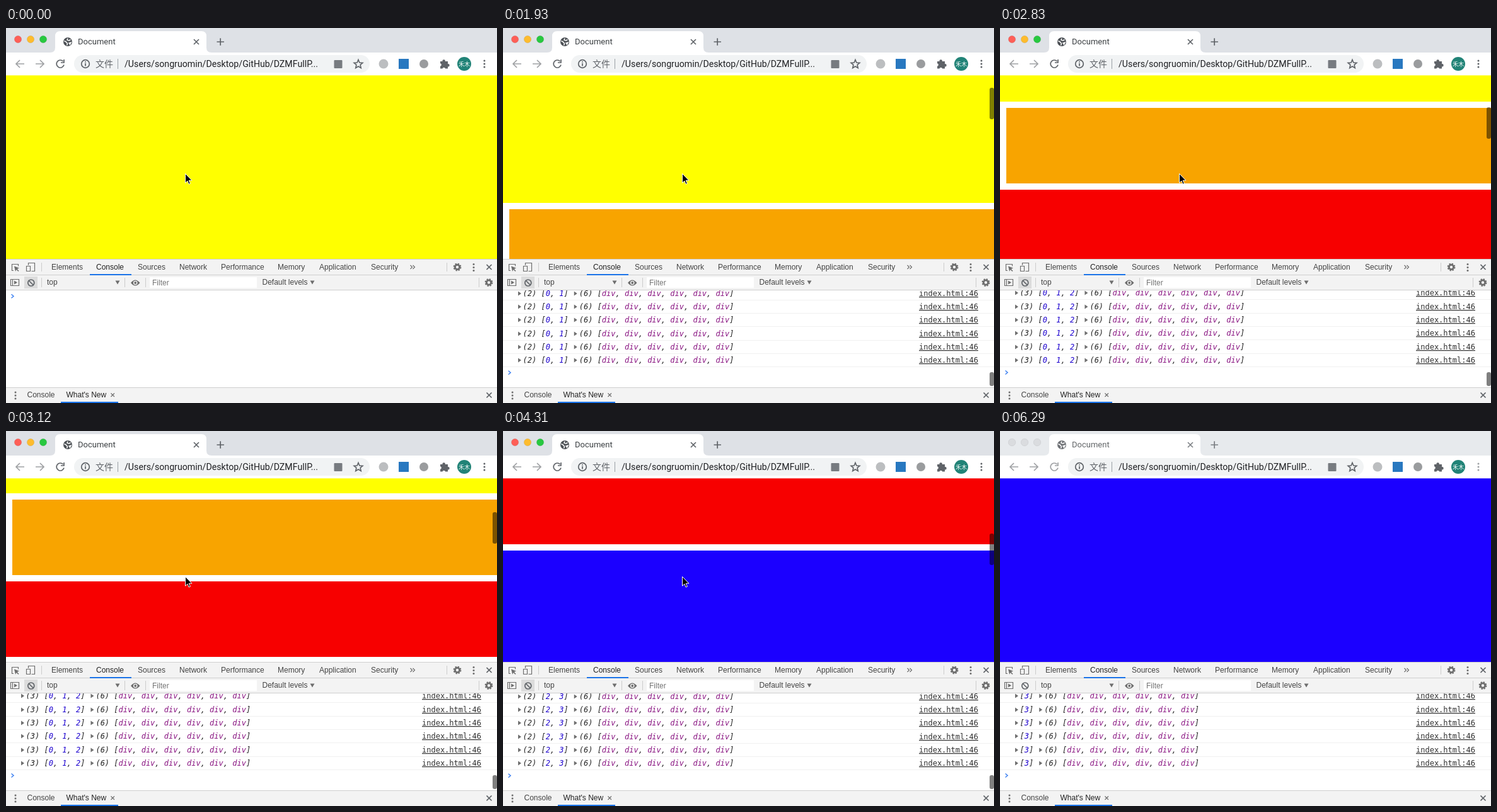
An HTML page for the animation above (6.39 s loop, 779 by 596 pixels).

```html
<!DOCTYPE html>
<html lang="en">
<head>
<meta charset="utf-8">
<title>Document</title>
<style>
html, body { margin: 0; width: 100%; height: 100%; overflow: hidden; background: #fff; }
svg { display: block; width: 779px; height: 596px; }
text { white-space: pre; }
.ui { font: 12px "Liberation Sans", Arial, sans-serif; fill: #444; }
.tab { font: 13px Roboto, sans-serif; fill: #3c4043; }
.url { font: 14.2px Roboto, sans-serif; fill: #202124; }
.cjk { font: 14px "Noto Sans CJK SC", "Noto Sans CJK", sans-serif; fill: #5f6368; }
.mono { font: 12px "DejaVu Sans Mono", monospace; fill: #303030; }
.log { font-style: oblique; fill: #222; }
.num { fill: #1c00cf; }
.tag { fill: #881280; }
.line { fill: none; stroke: #5f6368; stroke-width: 1.7; }
.thin { fill: none; stroke: #6e6e6e; stroke-width: 1.2; }
.dark { fill: #5f6368; }
.mid { fill: #6e6e6e; }
</style>
</head>
<body>
<svg viewBox="0 0 779 596" xmlns="http://www.w3.org/2000/svg">
  <defs>
    <clipPath id="view"><rect y="75" width="779" height="292"/></clipPath>
    <clipPath id="pane"><rect y="417" width="779" height="154"/></clipPath>
    <g id="gear">
      <circle r="3.6" fill="none" stroke="#6e6e6e" stroke-width="2.8"/>
      <circle r="5.4" fill="none" stroke="#6e6e6e" stroke-width="2" stroke-dasharray="2.4 1.84"/>
    </g>
    <path id="cross" d="M-4-4 4 4M4-4-4 4"/>
    <g id="dots"><circle cy="-5" r="1.5"/><circle r="1.5"/><circle cy="5" r="1.5"/></g>
    <path id="down" d="M-3.5-3h7l-3.5 6z"/>
  </defs>

  <!-- page -->
  <rect width="779" height="596" fill="#fff"/>
  <g clip-path="url(#view)">
    <g id="page">
      <rect width="779" height="300" fill="#ff0"/>
      <rect x="10" y="310" width="769" height="120" fill="#f8a400"/>
      <rect y="440" width="779" height="120" fill="#f70000"/>
      <rect y="570" width="779" height="400" fill="#1b00ff"/>
    </g>
    <rect id="pageBar" x="772" width="7" height="50" rx="3"/>
  </g>

  <!-- browser bar -->
  <rect id="strip" width="779" height="39"/>
  <path d="M70 39q8 0 8-8V13q0-8 8-8h224q8 0 8 8v18q0 8 8 8z" fill="#fff"/>
  <g id="lights"></g>
  <g id="title">
    <circle cx="98" cy="22" r="7" fill="#4d5156"/>
    <path d="M92.500 20.500l3.500 2 1.500 2.500-1 2.500M98 16.500l-1 2.500 3 1 2.500-1.500M100 24l3-1-1.500 3z" fill="none" stroke="#fff" stroke-width="1.5"/>
    <text class="tab" x="114" y="26">Document</text>
    <use href="#cross" x="302" y="22" class="line"/>
    <path class="line" stroke-width="2" d="M334.500 22h11.500M340.200 16.200v11.600"/>
  </g>
  <g opacity=".6"><path class="line" d="M29 57H16.500M22 51l-6 6 6 6"/></g>
  <g opacity=".6"><path class="line" d="M47 57h12.500M54 51l6 6-6 6"/></g>
  <path id="reload" class="line" stroke-width="2" d="M90.500 52.800A6 6 0 1 0 92 58.500M92 50v5h-5"/>
  <rect x="108" y="43" width="469" height="28" rx="14" fill="#f1f3f4"/>
  <circle class="line" cx="126" cy="57" r="6.300"/>
  <path class="line" d="M126 56v4.500M126 53v1.700"/>
  <text class="cjk" x="142" y="62">文件</text>
  <rect x="177" y="49" width="1" height="16" fill="#9aa0a6"/>
  <text class="url" x="188" y="62">/Users/songruomin/Desktop/GitHub/DZMFullP...</text>
  <rect x="520.500" y="51" width="13" height="13" rx="1" fill="#777b80"/>
  <path class="line" stroke-width="1.400" d="M559 50.500l1.900 4.500 4.900.4-3.700 3.200 1.100 4.800-4.200-2.500-4.200 2.500 1.100-4.800-3.700-3.200 4.900-.4z"/>
  <circle cx="599" cy="57" r="7.500" fill="#bcbec0"/>
  <rect x="623" y="49" width="16" height="16" fill="#2878c0"/>
  <circle cx="663" cy="57" r="7" fill="#9a9c9e"/>
  <path class="dark" d="M689 53h3.500a2.200 2.200 0 1 1 4.300 0h4.200v4a2.200 2.200 0 1 1 0 4.300v3.200h-4a2.300 2.300 0 0 0-4.500 0H689v-3.800a2.300 2.300 0 0 0 0-4.500z"/>
  <circle cx="727" cy="57" r="11" fill="#218377"/>
  <text x="727" y="60.500" text-anchor="middle" style="font:9px 'Noto Sans CJK SC','Noto Sans CJK',sans-serif" fill="#fff">禾木</text>
  <use id="menu" href="#dots" x="759" y="57" class="dark"/>
  <rect y="75" width="779" height="1" fill="#fff" opacity=".3"/>

  <!-- tools header -->
  <rect y="367" width="779" height="50" fill="#f3f3f3"/>
  <path d="M0 367.500h779M0 392.500h779M0 416.500h779" stroke="#cfcfcf"/>
  <path d="M56.500 373v14M699.500 373v14M56.500 397v15M188.500 397v15M221.500 397v15M750.500 397v15" stroke="#ccc"/>
  <path class="thin" d="M12 385.500H9.500v-10h10v3"/>
  <path class="mid" d="M13 378.500l8 3-3.200 1.500 2.700 3-1.200 1-2.700-3-1.600 3z"/>
  <path class="thin" d="M35.500 377v-3.500h10v13h-5M32.500 378.500h6v8h-6z"/>
  <g id="tabs"></g>
  <path class="thin" stroke-width="1.400" d="M641.500 377l3 3-3 3M645.500 377l3 3-3 3"/>
  <rect x="133" y="391" width="66" height="2" fill="#1a73e8"/>
  <use href="#gear" x="716" y="380"/>
  <use href="#dots" x="742" y="380.500" class="mid"/>
  <use href="#cross" x="766.500" y="380" class="line"/>

  <!-- console toolbar -->
  <rect id="pressed" x="29" y="395" width="21" height="19" fill="#dcdcdc"/>
  <path class="thin" d="M7.500 399.500h13v10h-13zM10.500 399.500v10"/>
  <path class="mid" d="M13 401.500l5 3-5 3z"/>
  <circle class="line" cx="39.800" cy="405" r="5"/>
  <path class="line" d="M36.300 401.500l7 7"/>
  <text class="ui" x="65" y="408">top</text>
  <use href="#down" x="177" y="404.500" class="mid"/>
  <path class="mid" d="M198 405q7-9 14.500 0-7.500 9-14.500 0z"/>
  <circle cx="205.200" cy="405" r="2.600" fill="#6e6e6e" stroke="#f3f3f3" stroke-width="1.400"/>
  <rect x="228" y="396" width="170" height="17" fill="#fff"/>
  <text class="ui" x="232" y="409" style="fill:#757575">Filter</text>
  <text class="ui" x="406.500" y="408">Default levels</text>
  <use href="#down" x="486" y="404.500" class="mid"/>
  <use href="#gear" x="766" y="404.500"/>

  <!-- console -->
  <g clip-path="url(#pane)">
    <g id="rows"></g>
    <path id="prompt" d="M8.500-3l3.500 3-3.500 3" fill="none" stroke="#367cf1" stroke-width="1.400"/>
    <rect id="logBar" x="772" width="7" rx="3"/>
  </g>

  <!-- drawer -->
  <rect y="571" width="779" height="25" fill="#f3f3f3"/>
  <path d="M0 571.500h779" stroke="#cfcfcf"/>
  <use href="#dots" x="15" y="584" class="mid"/>
  <text class="ui" x="33.500" y="587">Console</text>
  <text class="ui" x="95.500" y="587" style="fill:#222">What's New</text>
  <path class="thin" stroke-width="1.400" d="M166.500 580.500l5.500 5.500M172 580.500l-5.500 5.500"/>
  <rect x="87" y="594" width="91" height="2" fill="#1a73e8"/>
  <use href="#cross" x="766.500" y="583.500" class="line"/>

  <path id="cursor" d="M284.500 231.500v14.700l3.400-3.200 2.200 5.200 2.300-1-2.200-5h4.700z" fill="#000" stroke="#fff"/>
</svg>
<script>
const LOOP = 6390, START = 900, BLUR = 6290;
const STEP = 148.5, STEP_BASE = 894;
const LOG_START = 850, LOG_END = 5060, LOG_GAP = 18.5;
const ROW = 64 / 3, VIEW = 292;

// time, scroll offset
const SCROLL = [[850, 0], [900, 16], [1340, 41], [2380, 173], [2830, 259], [3120, 294],
  [3570, 361], [4310, 455], [4760, 535], [4910, 563], [5052, 570]];
// top and bottom of each section
const SECTIONS = [[0, 300], [310, 430], [440, 560], [570, 970]];
const TABS = [["Elements", 72], ["Console", 143], ["Sources", 209], ["Network", 275],
  ["Performance", 341], ["Memory", 431], ["Application", 497], ["Security", 579]];
const LIGHTS = ["#fe5f57", "#febc2e", "#28c840"];

const el = id => document.getElementById(id);
const set = (id, attrs) => {
  for (const name in attrs) el(id).setAttribute(name, attrs[name]);
};

function scrollAt(t) {
  if (t <= SCROLL[0][0]) return 0;
  for (let i = 1; i < SCROLL.length; i++) {
    const [t0, a] = SCROLL[i - 1], [t1, b] = SCROLL[i];
    if (t < t1) return a + (b - a) * (t - t0) / (t1 - t0);
  }
  return SCROLL[SCROLL.length - 1][1];
}

function visibleAt(t) {
  const s = scrollAt(t);
  return [0, 1, 2, 3].filter(i => SECTIONS[i][0] < s + VIEW && SECTIONS[i][1] > s);
}

const arrow = (x, y) => `<path class="mid" d="M${x} ${y - 3.5}l5 3.500-5 3.500z"/>`;

const list = (items, cls) =>
  "[" + items.map(v => `<tspan class="${cls}">${v}</tspan>`).join(", ") + "]";

function row(items, y) {
  const many = items.length > 1;
  const chars = items.length * 3 + (many ? 4 : 0);
  const x = 31.5 + chars * 7.224 + 17;
  const base = y + 4;
  return arrow(24, y) + arrow(x - 8, y) +
    `<text class="mono log" x="31.500" y="${base}">${many ? `(${items.length}) ` : ""}${list(items, "num")}</text>` +
    `<text class="mono log" x="${x}" y="${base}">(6) ${list(Array(6).fill("div"), "tag")}</text>` +
    `<text class="mono" x="660" y="${base}" text-decoration="underline">index.html:46</text>` +
    `<rect y="${y + 10}" width="779" height="1" fill="#f0f0f0"/>`;
}

function drawLog(t, fade) {
  const end = Math.min(t, LOG_END);
  const count = Math.max(0, Math.floor((end - LOG_START) / LOG_GAP));
  const latest = visibleAt(end);
  const nudge = latest.length === 2 ? 0.3 : latest[0] === 1 ? -0.2 : 0;
  const promptY = Math.min(426.3 + count * ROW, 547.5 + nudge);
  let html = "";
  for (let k = 0; k < Math.min(count, 7); k++)
    html += row(visibleAt(end - k * LOG_GAP), Math.round(promptY - 19.5 - k * ROW));
  el("rows").innerHTML = html;
  set("prompt", { transform: `translate(0 ${promptY})` });

  const content = count * ROW + 20;
  const size = Math.max(22, 154 * 154 / content);
  set("logBar", { y: 569 - size, height: size, opacity: content > 154 ? fade : 0 });
}

function drawWindow(active) {
  set("strip", { fill: active ? "#dee1e6" : "#e7eaed" });
  el("lights").innerHTML = LIGHTS.map((c, i) =>
    `<circle cx="${19 + i * 20}" cy="18" r="5.700" fill="${active ? c : "#dadcdf"}" ` +
    `stroke="${active ? "#0002" : "#c8cacd"}" stroke-width=".6"/>`).join("");
  set("title", { opacity: active ? 1 : 0.8 });
  set("reload", { opacity: active ? 1 : 0.6 });
  set("menu", { opacity: active ? 1 : 0.6 });
  set("pressed", { opacity: active ? 1 : 0 });
}

function draw(t) {
  const s = Math.round(scrollAt(t));
  const fade = t < 5490 ? 0.5 : t < 5640 ? 0.3 : t < 5790 ? 0.12 : 0;
  set("page", { transform: `translate(0 ${75 - s})` });
  set("pageBar", { y: Math.round(77 + s * 0.1885), opacity: s > 0 ? fade : 0 });
  set("cursor", { opacity: t < 5790 ? 1 : 0 });
  drawLog(t, fade);
  drawWindow(t < BLUR);
}

// the picture advances in steps, as a screen capture does
function stepTime(t) {
  if (t < START) return 0;
  if (t >= BLUR) return BLUR;
  return STEP_BASE + Math.floor((t - STEP_BASE) / STEP) * STEP;
}

el("tabs").innerHTML = TABS.map(([name, x]) =>
  `<text class="ui" x="${x}" y="384"${name === "Console" ? ' style="fill:#222"' : ""}>${name}</text>`).join("");

const origin = performance.now();
let shown = -1;
function tick() {
  const t = stepTime((performance.now() - origin) % LOOP);
  if (t !== shown) draw(shown = t);
  requestAnimationFrame(tick);
}
tick();
</script>
</body>
</html>
```
